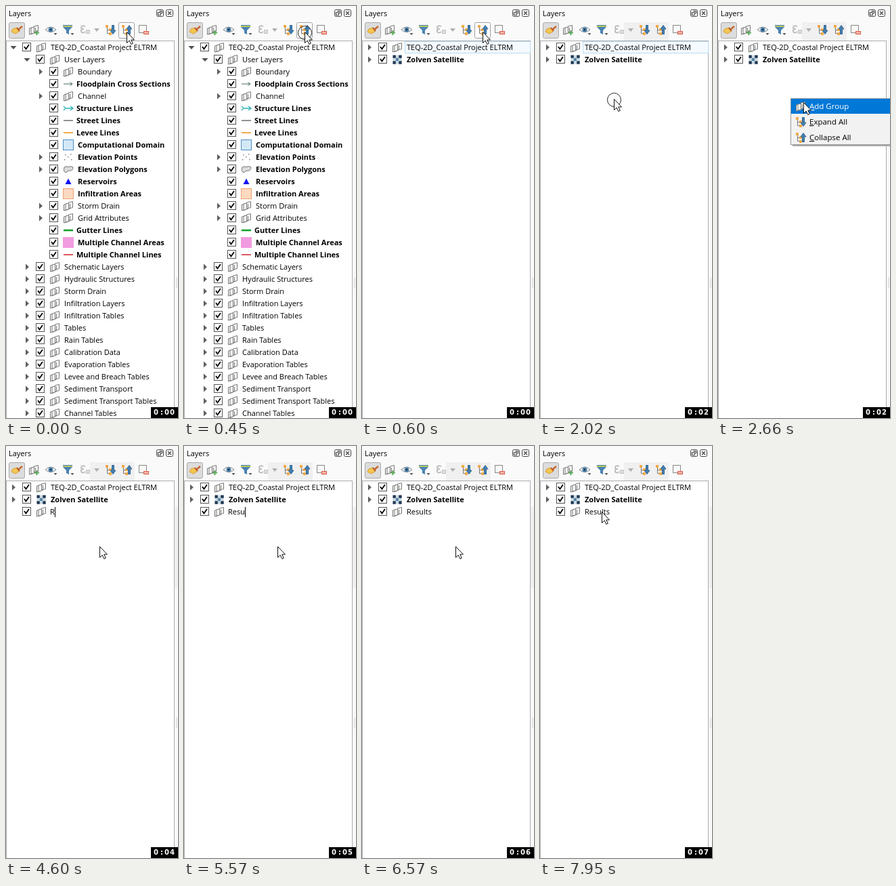
These frames come from a looping animation (254x608 px, 8000 ms). An HTML page:

```html
<!DOCTYPE html>
<html lang="en">
<head>
<meta charset="utf-8">
<title>Layers panel</title>
<style>
  html, body { margin: 0; width: 100%; height: 100%; overflow: hidden; background: #fafafa; }
  svg { display: block; }
  text { font: 11px "Open Sans", "Noto Sans", sans-serif; fill: #000; white-space: pre; }
  .bold { font-weight: 700; }
  .menu text { font-size: 11.5px; }
  .light, .menu .light { fill: #fff; }
  .clock { font: bold 10px "DejaVu Sans", sans-serif; fill: #fff; }
</style>
</head>
<body>
<svg id="stage" width="254" height="608" viewBox="0 0 254 608"></svg>
<script>
const LOOP = 8000;
const at = (x, y, body) => `<g transform="translate(${x} ${y})">${body}</g>`;
const rect = (x, y, w, h, fill, stroke) =>
  `<rect x="${x}" y="${y}" width="${w}" height="${h}" fill="${fill}"${stroke ? ` stroke="${stroke}"` : ''}/>`;
const line = (d, color, width = 1) => `<path d="${d}" fill="none" stroke="${color}" stroke-width="${width}"/>`;
const shape = (d, fill, stroke = 'none') => `<path d="${d}" fill="${fill}" stroke="${stroke}"/>`;
const text = (x, y, s, cls = '') => `<text x="${x}" y="${y}" class="${cls}">${s}</text>`;
const part = (id, body, cls = '') => `<g id="${id}" class="${cls}">${body}</g>`;

// Icons are drawn around their own centre.
const swatch = (fill, stroke) => rect(-7.5, -7.5, 15, 15, fill, stroke);
const stroke = (color, width) => line('M-7 0H7', color, width);
const sheet = (x, y) => at(x, y, shape('M-3 -3.5L3 -5V4L-3 5.5Z', '#f8f8f6', '#777'));
const treeIcon = arrow =>
  line('M-4.5 -5V5.5H-1M-4.5 .5H-1', '#777') +
  [[-7, -7], [-2, -2], [-2, 4]].map(([x, y]) => rect(x, y, 4, 4, '#efaa4a')).join('') +
  shape(arrow, '#4680b0', '#2f6493');
const checkers = Array.from({ length: 9 }, (_, i) =>
  rect(-6.5 + i % 3 * 4.4, -6.5 + Math.floor(i / 3) * 4.4, 4.4, 4.4,
    i === 4 ? '#5985a8' : i % 2 ? '#c9d9e3' : '#1d3650')).join('');

const icons = {
  group: sheet(-3.5, 1.5) + sheet(-1, .5) + sheet(3.5, -1.5) + line('M2.5 3V-3', '#777'),
  raster: checkers,
  section: line('M-7 0H6M2.5 -2.5L6 0L2.5 2.5', '#3f6b55'),
  teal: line('M-7 -3L-4 0L-7 3M-4 0H7M3 -3L7 0L3 3', '#2fb5b5', 1.3),
  gray: stroke('#777', 1.6),
  orange: stroke('#f0a23a', 1.8),
  domain: swatch('#d3e8f7', '#4f8fc4'),
  points: shape('M-5 -4h1.5v1.5h-1.5zM3 -5h1.5v1.5h-1.5zM-1 -1h1.5v1.5h-1.5zM-6 3h1.5v1.5h-1.5zM4 3h1.5v1.5h-1.5z', '#8a7f8c'),
  polygon: shape('M-6 -3Q-3 -5 0 -3.5Q4 -5.5 7 -3Q7 2 3 2Q0 1 -3 4.5Q-8 5 -6 -3Z', '#ddd', '#777'),
  triangle: shape('M0 -4.5L4.5 4H-4.5Z', '#1414ee'),
  peach: swatch('#fcd9c0', '#f0a070'),
  green: stroke('#12a02c', 2.6),
  pink: rect(-8, -8, 16, 16, '#f19be0'),
  red: stroke('#d9474d', 1.8),
  expand: treeIcon('M2.5 -6.5H5.5V1H8L4 6.5L0 1H2.5Z'),
  collapse: treeIcon('M2.5 6.5H5.5V-1H8L4 -6.5L0 -1H2.5Z')
};

const closedArrow = shape('M-2 -4.5L3 0L-2 4.5Z', '#606060');
const openArrow = shape('M-4.5 -2L0 3L4.5 -2Z', '#505050');
const checkbox = rect(-6, -6, 12, 12, '#fff', '#555') + line('M-3.5 -.5L-1 3L3.5 -3.5', '#000', 1.8);

const rowY = i => 61 + 18 * i;
// arrow: '+' closed, '-' open, '' none
function row(i, level, arrow, icon, label, bold) {
  const x = level * 20, y = rowY(i);
  const isLine = ['section', 'teal', 'gray', 'orange', 'green', 'red'].includes(icon);
  return (arrow ? at(11 + x, y, arrow === '+' ? closedArrow : openArrow) : '') +
    at(30.5 + x, y - .5, checkbox) + at(52 + x, y, icons[icon]) +
    (label ? text(66 + x - (isLine ? 2 : 0), y + 4, label, bold ? 'bold' : '') : '');
}

const project = 'TEQ-2D_Coastal Project ELTRM';
const layers = [
  ['+', 'group', 'Boundary'], ['', 'section', 'Floodplain Cross Sections'], ['+', 'group', 'Channel'],
  ['', 'teal', 'Structure Lines'], ['', 'gray', 'Street Lines'], ['', 'orange', 'Levee Lines'],
  ['', 'domain', 'Computational Domain'], ['+', 'points', 'Elevation Points'],
  ['+', 'polygon', 'Elevation Polygons'], ['', 'triangle', 'Reservoirs'], ['', 'peach', 'Infiltration Areas'],
  ['+', 'group', 'Storm Drain'], ['+', 'group', 'Grid Attributes'], ['', 'green', 'Gutter Lines'],
  ['', 'pink', 'Multiple Channel Areas'], ['', 'red', 'Multiple Channel Lines']
];
const groups = ['Schematic Layers', 'Hydraulic Structures', 'Storm Drain', 'Infiltration Layers',
  'Infiltration Tables', 'Tables', 'Rain Tables', 'Calibration Data', 'Evaporation Tables',
  'Levee and Breach Tables', 'Sediment Transport', 'Sediment Transport Tables', 'Channel Tables'];

const openTree = row(0, 0, '-', 'group', project) + row(1, 1, '-', 'group', 'User Layers') +
  layers.map(([arrow, icon, label], i) => row(i + 2, 2, arrow, icon, label, icon !== 'group')).join('') +
  groups.map((label, i) => row(i + 18, 1, '+', 'group', label)).join('');
const closedTree = part('rowHover', rect(63.5, 52.5, 185, 17, '#f4faff', '#b9dcf2')) +
  row(0, 0, '+', 'group', project) + row(1, 0, '+', 'raster', 'Zolven Satellite', true);

const titleBar = text(4, 15, 'Layers') +
  '<g fill="none" stroke="#444"><rect x="222.5" y="5.5" width="10" height="10" rx="2"/>' +
  '<rect x="236.5" y="5.5" width="10" height="10" rx="2"/>' +
  '<path d="M227.5 7.5h3v3h-3zM226.5 9.5h-2v4h4v-2M239 8l5 5M244 8l-5 5" stroke-width="1.2"/></g>';

const dropArrow = shape('M-2.5 -1H2.5L0 2Z', '#555');
const toolbar =
  '<rect x="4.5" y="24.5" width="23" height="23" rx="2" fill="#dcdcdc" stroke="#aaa"/>' +
  at(16, 36, line('M2 -1L8 -6', '#c9662f', 2.5) + shape('M0 -4L4 1L-2 5L-8 2L-6 -2Z', '#f3c552', '#d9a035') +
    line('M0 -4L4 1', '#b5532c', 2)) +
  at(41, 35, icons.group + line('M4.5 1V8M1 4.5H8', '#58a85a', 2)) +
  at(66, 35, shape('M-8 0Q0 -8 8 0Q0 7 -8 0Z', '#f5f7f8', '#7b858c') +
    '<circle r="3.5" fill="#4f83ad"/><circle r="1.4" fill="#17354d"/>' + at(7, 6, dropArrow)) +
  at(91, 35, shape('M-7 -7H7V-4L2 1V7L-2 5V1L-7 -4Z', '#4a82b4') + line('M-7 -5H7', '#b7c858', 2) + at(7, 6, dropArrow)) +
  at(117, 35, line('M0 -5Q-6 -7 -6 -3Q-6 -1 -2 -1Q-7 -1 -6 3Q-4 6 0 3', '#bdbdbd', 2) +
    rect(1.5, 0.5, 5, 5, '#ddd', '#c4c4c4')) +
  at(134, 35, shape('M-4 -2H4L0 3Z', '#b0b0b0')) +
  at(154, 35, icons.expand) + at(178, 35, icons.collapse) +
  at(203, 35, rect(-6.5, -6.5, 11, 11, '#f8f8f6', '#888') + rect(.5, 2.5, 7, 4, '#f3b3a6', '#dd5a48'));

const menuItem = (y, icon, label, cls = '') =>
  at(122, y, icons[icon]) + text(135, y + 4, `<tspan text-decoration="underline">${label[0]}</tspan>${label.slice(1)}`, cls);
const menu = rect(110, 204, 144, 3, '#aaa') + rect(107.5, 136.5, 150, 68, '#f2f2f2', '#9a9a9a') +
  part('menuHover', rect(108, 137, 146, 22, '#0078d7')) +
  part('menuIdle', menuItem(148, 'group', 'Add Group')) +
  part('menuActive', menuItem(148, 'group', 'Add Group', 'light')) +
  menuItem(171, 'expand', 'Expand All') + menuItem(194, 'collapse', 'Collapse All');

const dots = Array.from({ length: 8 }, (_, i) => rect(251 + i % 2, 401 + 2 * i, 1, 1, '#aaa')).join('');

const stage = document.getElementById('stage');
stage.innerHTML = rect(0, 0, 254, 608, '#fafafa') +
  part('toolbarPatch', rect(124, 24, 66, 27, '#f0f0f0')) + part('edgePatch', rect(249, 90, 5, 120, '#f0f0f0')) +
  titleBar +
  part('buttonHover', '<rect x="166.5" y="24.5" width="23" height="23" rx="2" fill="#fff" stroke="#a0a0a0"/>') +
  toolbar + rect(.5, 51.5, 248, 560, '#fff', '#a8acb1') + dots +
  part('openTree', openTree) + part('closedTree', closedTree) +
  part('newRow', row(2, 0, '', 'group', '')) +
  part('selection', rect(65, 90, 39, 15, '#0078d7')) + `<text id="name" y="${rowY(2) + 4}"></text>` +
  part('caret', rect(0, 90, 1, 15, '#000')) +
  part('menu', menu, 'menu') +
  rect(214, 592, 40, 16, '#000') + '<text id="clock" class="clock" x="218 228 234 242" y="603"></text>' +
  part('cursor', '<circle id="ring" cx=".5" cy="1.5" r="10" fill="none" stroke="#222"/>' +
    shape('M.5 .5V16.5L4.2 13L6.8 18.5L9.3 17.3L6.8 12H11.5Z', '#fff', '#111'));

const el = id => document.getElementById(id);
const during = (t, ...spans) => spans.some(([from, to = LOOP]) => t >= from && t < to);
const latest = (t, cues) => cues.filter(cue => cue[0] <= t).pop();

// Time windows in which each part is visible.
const visible = {
  openTree: [[0, 600]], closedTree: [[600]], buttonHover: [[0, 1170]], rowHover: [[600, 2270]],
  toolbarPatch: [[1170]], edgePatch: [[2920]],
  menu: [[2140, 2920]], menuHover: [[2660, 2920]], menuActive: [[2660, 2920]], menuIdle: [[2140, 2660]],
  newRow: [[2920]], selection: [[3050, 4600]],
  caret: [[3310, 3920], [4450, 6420]],
  ring: [[450, 600], [2020, 2140], [2790, 2920], [7400, 7520], [7800, 7950]]
};
const cursorPath = [[0, 178, 38], [1170, 158, 80], [1300, 119, 145], [1580, 114, 141], [1720, 109, 137],
  [2660, 126, 142], [3180, 134, 146], [3310, 138, 148], [7400, 91, 97]];
const names = [[0, ''], [2920, 'group1'], [4600, 'R'], [4750, 'Re'], [5140, 'Res'], [5570, 'Resu'],
  [5720, 'Resul'], [5870, 'Result'], [6020, 'Results']];
const seconds = [[0, 0], [900, 1], [1880, 2], [3050, 3], [4020, 4], [5040, 5], [6020, 6], [7130, 7]];

function render(t) {
  for (const id in visible) el(id).style.display = during(t, ...visible[id]) ? '' : 'none';
  const [, x, y] = latest(t, cursorPath);
  el('cursor').setAttribute('transform', `translate(${x} ${y})`);

  const name = el('name');
  name.textContent = latest(t, names)[1];
  name.setAttribute('x', during(t, [3050, 6570]) ? 65 : 66);
  name.setAttribute('class', during(t, [3050, 4600]) ? 'light' : '');
  const end = t < 4600 ? 103 : Math.round(65 + name.getComputedTextLength());
  el('caret').setAttribute('transform', `translate(${end} 0)`);

  el('clock').textContent = '0:0' + latest(t, seconds)[1];
}

const start = performance.now();
function tick() {
  render((performance.now() - start) % LOOP);
  requestAnimationFrame(tick);
}
tick();
</script>
</body>
</html>
```
